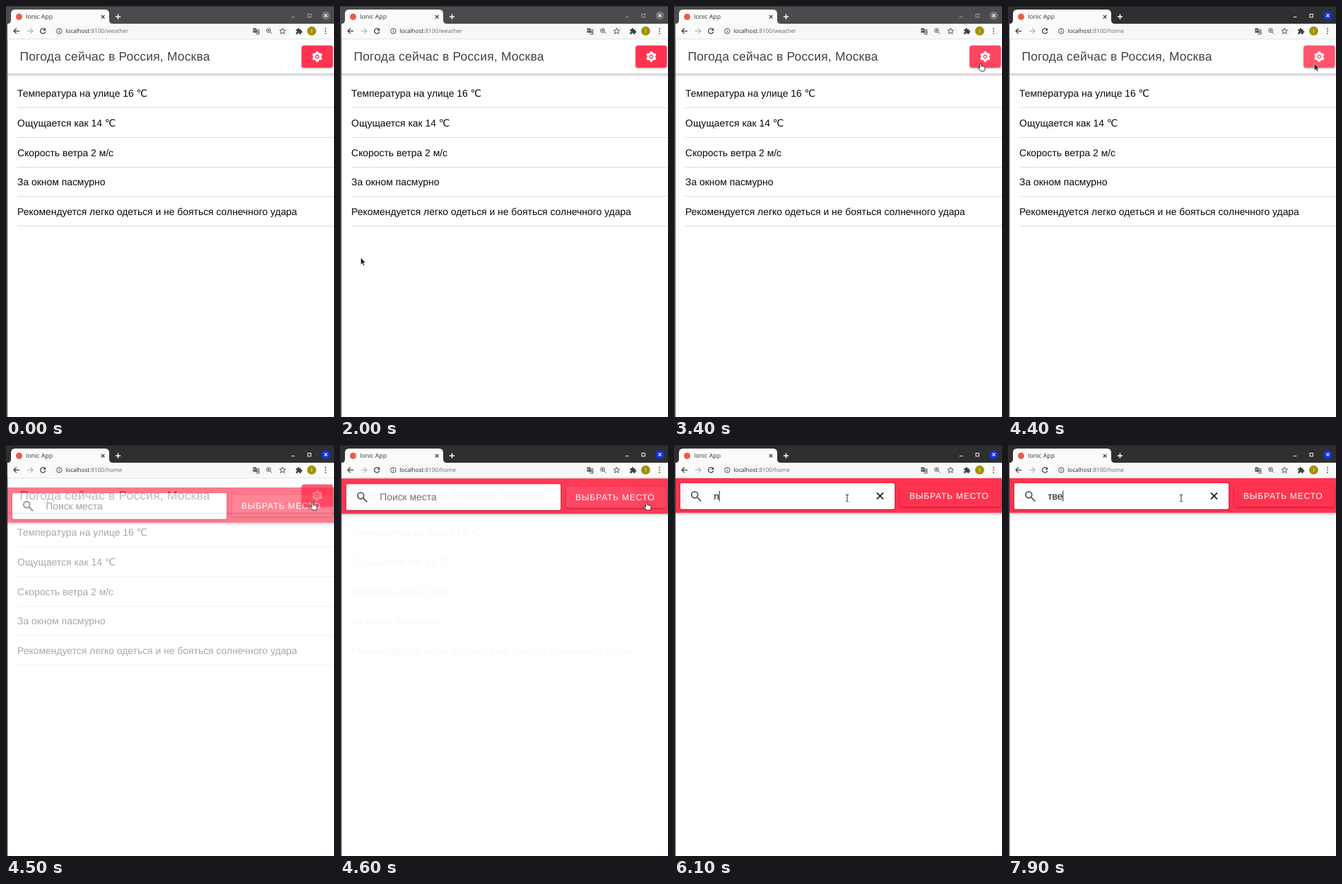
These frames come from a looping animation (464 px wide and 580 px high, 8 s). An HTML page:

```html
<!DOCTYPE html>
<html lang="ru">
<head>
<meta charset="utf-8">
<title>Weather</title>
<style>
html, body { margin: 0; width: 100%; height: 100%; overflow: hidden; background: #fff; }
svg { display: block; width: 464px; height: 580px; }
text { font-family: "Liberation Sans", "DejaVu Sans", sans-serif; white-space: pre; text-rendering: geometricPrecision; }
.ui { font-family: "Open Sans", "Noto Sans", sans-serif; }
.line { fill: none; stroke: #3c4043; stroke-width: 1.3; }
.item { font-size: 13.9px; fill: #080808; }
.raised { filter: drop-shadow(0 1.4px 1.5px rgba(0, 0, 0, .34)); }
</style>
</head>
<body>
<svg viewBox="0 0 464 580">
  <defs>
    <linearGradient id="shade" x2="0" y2="1">
      <stop stop-color="#000" stop-opacity=".28"/>
      <stop offset=".35" stop-color="#000" stop-opacity=".11"/>
      <stop offset="1" stop-color="#000" stop-opacity="0"/>
    </linearGradient>
    <clipPath id="view"><rect x="2" y="46" width="462" height="534"/></clipPath>
  </defs>

  <rect width="464" height="580" fill="#fff"/>

  <g clip-path="url(#view)">
    <g id="weather">
      <rect x="2" y="95.5" width="462" height="5" fill="url(#shade)"/>
      <text x="19.5" y="77" font-size="17.4" letter-spacing=".217" fill="#424242">Погода сейчас в Россия, Москва</text>
      <rect class="raised" x="418.2" y="55.8" width="44.2" height="31.2" rx="3.5" fill="#ff3350"/>
      <rect id="gearGlow" x="418.2" y="55.8" width="44.2" height="31.2" rx="3.5" fill="#fff"/>
      <g id="gear" transform="translate(440.3 71.5)" fill="none" stroke="#fff" stroke-linejoin="round">
        <circle r="4.4" stroke-width="3"/>
        <circle r="1.5" fill="#fff" stroke="none"/>
      </g>
      <g id="items"></g>
    </g>

    <g id="home">
      <rect x="2" y="46" width="462" height="574" fill="#fff"/>
      <rect x="2" y="95.5" width="462" height="5" fill="url(#shade)"/>
      <rect x="2" y="46" width="462" height="49.7" fill="#ff3350"/>
      <rect class="raised" x="9" y="54" width="303" height="36.5" rx="2" fill="#fff"/>
      <g fill="none" stroke="#5c5c5c" stroke-width="1.9">
        <circle cx="29.3" cy="70.3" r="4.4"/>
        <path d="M32.6 73.6L38.3 79.3"/>
      </g>
      <text id="hint" x="56.2" y="77" font-size="13.9" fill="#707070">Поиск места</text>
      <text id="query" x="56.2" y="77" font-size="13.9" fill="#141414"></text>
      <rect id="caret" y="64.5" width="1" height="15" fill="#222"/>
      <path id="clear" d="M287 67.3l9 9m0-9l-9 9" fill="none" stroke="#222" stroke-width="1.9"/>
      <rect class="raised" x="320" y="57" width="142.4" height="30.2" rx="3.5" fill="#ff3350"/>
      <rect id="pickGlow" x="320" y="57" width="142.4" height="30.2" rx="3.5" fill="#fff"/>
      <text x="333" y="76.4" font-size="12.15" letter-spacing=".73" fill="#fff">ВЫБРАТЬ МЕСТО</text>
    </g>
  </g>

  <!-- browser window -->
  <g id="frame">
    <rect width="464" height="26"/>
    <rect width="2.2" height="580"/>
  </g>
  <rect width="464" height="1" fill="#000" opacity=".25"/>
  <path d="M2 25q5 0 5-5v-9q0-6 6-6h127q6 0 6 6v9q0 5 5 5h313v21.5H2z" fill="#fbfbfa"/>
  <rect x="2" y="46" width="462" height=".8" fill="#dcdcdc"/>
  <rect x="65" y="27.5" width="337" height="16" rx="8" fill="#f7f7f7"/>
  <circle cx="18.5" cy="15.2" r="4.5" fill="#ee5a48"/>
  <text class="ui" x="28" y="18.2" font-size="8.75" fill="#333">Ionic App</text>
  <path class="line" d="M134.8 12.9l4.6 4.6m0-4.6l-4.6 4.6" stroke-width="1"/>
  <path d="M158.5 11.6v7.2m-3.6-3.6h7.2" stroke="#fff" stroke-width="1.5"/>
  <path class="line" d="M19.2 35.3h-8m3.6-3.8l-3.8 3.8l3.8 3.8"/>
  <path class="line" d="M29.8 35.3h8m-3.6-3.8l3.8 3.8l-3.8 3.8" style="stroke:#b4b6b8"/>
  <path class="line" d="M55 33a3.6 3.6 0 1 0 .7 3.2"/>
  <path d="M56.2 31v3.8h-3.8z" fill="#3c4043"/>
  <g class="line" style="stroke-width:.9">
    <circle cx="75.3" cy="35.4" r="3.7"/>
    <path d="M75.3 34.8v2.6m0-4.6v1"/>
    <circle cx="371.5" cy="34.5" r="2.9"/>
    <path d="M373.7 36.7l2.6 2.6m-6.2-4.8h2.8m-1.4-1.4v2.8"/>
    <path d="M391.3 31.2l1.2 2.8l3 .2l-2.3 2l.8 3l-2.7-1.7l-2.7 1.7l.8-3l-2.3-2l3-.2z"/>
    <path d="M354 33.6h4v6.2h-4.6m1-1.4l1.4-3l1.4 3"/>
  </g>
  <path d="M349.5 31.2h4.2l1.8 6.5h-6z" fill="#55595c"/>
  <path d="M350.6 34.2h2.4" stroke="#fff"/>
  <path d="M410.2 33h2.3q-.2-2 1.3-2t1.3 2h2.4v2.3q1.8-.2 1.8 1.2t-1.8 1.2v2h-2.4q.1-1.6-1.2-1.6t-1.2 1.6h-2.5v-2.4q1.6 0 1.6-1.1t-1.6-1.1z" fill="#3c4043"/>
  <circle cx="432.4" cy="35.2" r="6.4" fill="#a0920c"/>
  <text class="ui" x="431.2" y="38" font-size="7.5" fill="#fff">I</text>
  <path d="M452 31.9h.01m-.01 3.4h.01m-.01 3.4h.01" stroke="#3c4043" stroke-width="1.8" stroke-linecap="round"/>
  <text class="ui" x="84.2" y="38.2" font-size="8.15" fill="#2b2b2b">localhost<tspan id="path" fill="#6c6c6c"></tspan></text>
  <g id="controls" fill="none" stroke-width="1">
    <path d="M403.8 15.6h4.6"/>
    <rect x="427" y="11.5" width="4.4" height="4.4"/>
  </g>
  <circle id="close" cx="452.4" cy="13.5" r="6"/>
  <path d="M450.3 11.4l4.2 4.2m0-4.2l-4.2 4.2" stroke="#fff" stroke-width="1.1"/>

  <!-- pointers share the hot spot at 0,0 -->
  <path id="arrow" d="M.3 0v10l2.3-2l1.5 3.4l1.7-.8l-1.5-3.3h3z" fill="#1c1c1c" stroke="#fff" stroke-width=".6"/>
  <path id="hand" d="M-.3 1q0-1.2 1.1-1.2t1.1 1.2v3q1.1-.6 1.8.2q1.1-.4 1.7.4q1.6-.2 1.6 1.3v2l-1.1 3h-5l-3.6-4.2q-.6-1.3.7-1.3l1.7 1.2z" fill="#fff" stroke="#222" stroke-width=".9"/>
  <path id="beam" d="M-2.2-5q2 0 2.2 1q.2-1 2.2-1M0-4v8M-2.2 5q2 0 2.2-1q.2 1 2.2 1" fill="none" stroke="#444" stroke-width="1.1"/>
</svg>
<script>
const LOOP = 8000, STEP = 100;
const SVG = "http://www.w3.org/2000/svg";
const $ = id => document.getElementById(id);
const set = (el, attrs) => { for (const k in attrs) el.setAttribute(k, attrs[k]); return el; };
const add = (parent, tag, attrs) => parent.appendChild(set(document.createElementNS(SVG, tag), attrs));
const show = (id, on) => $(id).style.display = on ? "" : "none";

// Linear interpolation over [time, value] keys
function track(keys, t) {
  if (t <= keys[0][0]) return keys[0][1];
  for (let i = 1; i < keys.length; i++) {
    const [t0, a] = keys[i - 1], [t1, b] = keys[i];
    if (t <= t1) return a + (b - a) * (t - t0) / (t1 - t0);
  }
  return keys[keys.length - 1][1];
}

// Last value whose time has been reached
const latest = (keys, t) => keys.filter(k => k[0] <= t).pop()[1];

const pointerX = [[2000, 29], [2300, 289], [2400, 289], [3300, 433], [4900, 433], [5200, 413],
  [5300, 413], [5500, 245], [6900, 245], [7100, 248], [7200, 248], [7300, 245]];
const pointerY = [[2000, 355], [2300, 200], [2400, 200], [3200, 84], [3300, 81], [4900, 81], [5200, 84],
  [5300, 84], [5500, 75], [6900, 75], [7100, 80], [7200, 80], [7300, 75]];
const pointers = [[0, ""], [2000, "arrow"], [3400, "hand"], [4100, "arrow"], [4500, "hand"],
  [5200, "arrow"], [5500, "beam"]];
const typed = [[0, ""], [6100, "n"], [6200, "nd"], [6300, "ndt"], [6600, "n"], [6700, ""],
  [7600, "т"], [7800, "тв"], [7900, "тве"]];
const carets = [[0, false], [5500, true], [7300, false], [7600, true]];
const gearGlow = [[3000, 0], [3300, .09], [4100, .09], [4400, .17]];
const pickGlow = [[4500, .08], [4900, .08], [5200, 0]];

["Температура на улице 16 ℃", "Ощущается как 14 ℃", "Скорость ветра 2 м/с", "За окном пасмурно",
  "Рекомендуется легко одеться и не бояться солнечного удара"].forEach((label, i) => {
  const y = 41.75 * i;
  add($("items"), "text", { class: "item", x: 16.1, y: 128 + y }).textContent = label;
  add($("items"), "rect", { x: 16, y: Math.floor(143.7 + y), width: 448, height: 1, fill: "#dcdcdc" });
});
for (let a = 0; a < 360; a += 60)
  add($("gear"), "path", { d: "M-1.5-5.6L-1-6.8H1L1.5-5.6z", "stroke-width": 1.2, fill: "#fff", transform: `rotate(${a})` });

function drawWindow(t) {
  const focused = t >= 4100;
  set($("frame"), { fill: focused ? "#2f2f31" : "#4b4a4c" });
  set($("controls"), { stroke: focused ? "#f2f2f2" : "#a5a5a5" });
  set($("close"), { fill: focused ? "#1433e6" : "#727274" });
  $("path").textContent = t >= 4300 ? ":8100/home" : ":8100/weather";
}

function drawPages(t) {
  const p = Math.min(1, Math.max(0, (t - 4432) / 280));
  const eased = 1 - (1 - p) ** 3.8;
  show("home", p > 0);
  set($("home"), { opacity: eased, transform: `translate(0 ${40 * (1 - eased)})` });
  set($("gearGlow"), { opacity: track(gearGlow, t) });
  set($("pickGlow"), { opacity: track(pickGlow, t) });
}

function drawSearch(t) {
  const text = latest(typed, t);
  $("query").textContent = text;
  show("hint", !text);
  show("clear", text);
  show("caret", latest(carets, t));
  set($("caret"), { x: 56 + (text ? $("query").getComputedTextLength() : 0) });
}

function drawPointer(t) {
  const kind = latest(pointers, t);
  for (const id of ["arrow", "hand", "beam"]) show(id, id === kind);
  if (kind) set($(kind), { transform: `translate(${track(pointerX, t)} ${track(pointerY, t)})` });
}

function draw() {
  const t = Math.floor(performance.now() % LOOP / STEP) * STEP;
  drawWindow(t);
  drawPages(t);
  drawSearch(t);
  drawPointer(t);
  requestAnimationFrame(draw);
}
draw();
</script>
</body>
</html>
```
